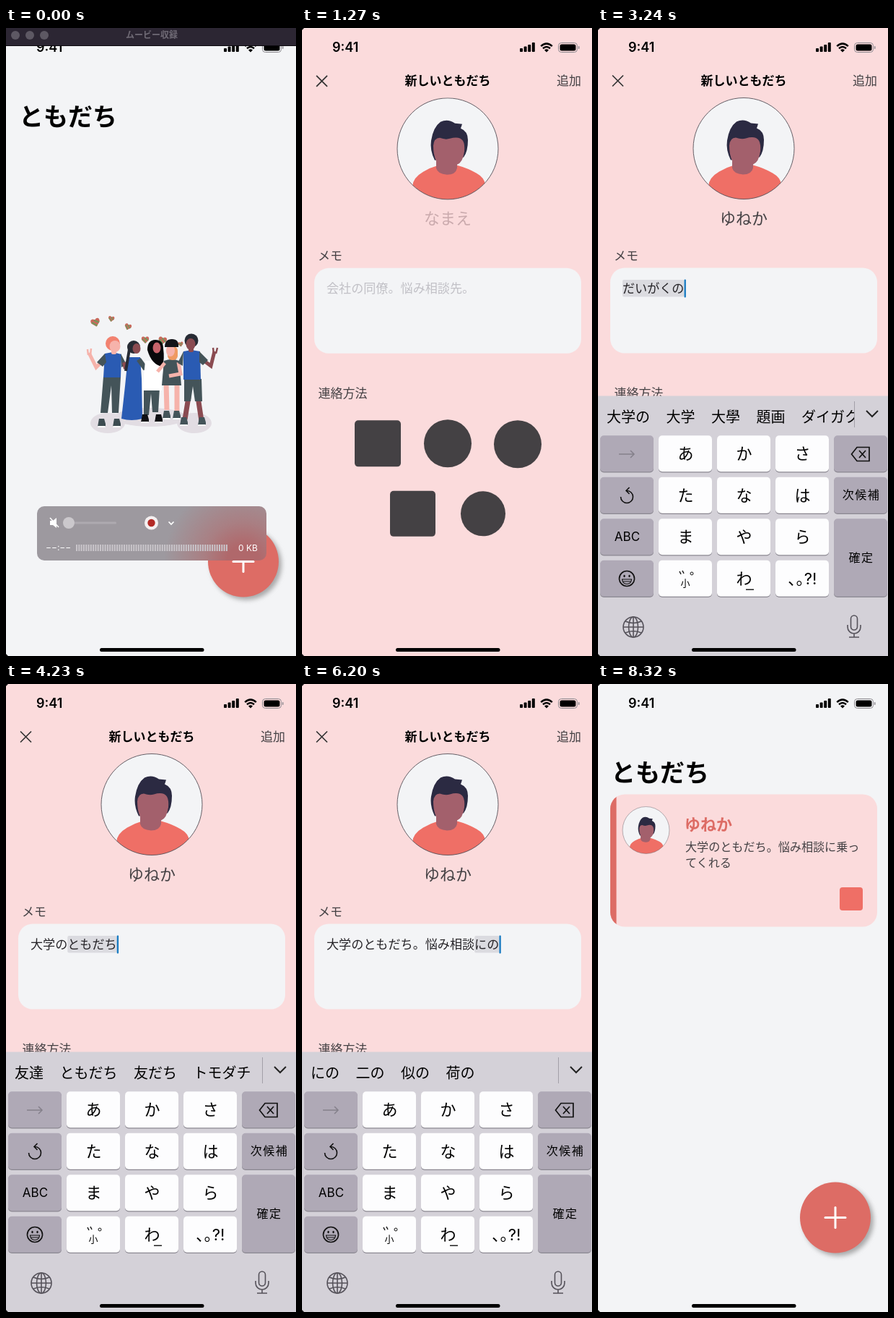
An HTML page for the animation above (8460 ms loop, 402x868 px).

```html
<!DOCTYPE html>
<html lang="ja">
<head>
<meta charset="utf-8">
<style>
html, body { margin: 0; width: 100%; height: 100%; overflow: hidden; background: #f3f4f6; }
svg { display: block; width: 402px; height: 868px; font-family: Inter, "Noto Sans CJK JP", "Noto Sans CJK", sans-serif; fill: #444144; }
.mid { text-anchor: middle; }
.stroke { fill: none; stroke: #3b383c; stroke-width: 1.6; }
.black { fill: #000; }
</style>
</head>
<body>
<svg id="stage" viewBox="0 0 402 868"></svg>
<script>
const LOOP = 8460, FRAME = 141;
const CORAL = '#dd6c65', PINK = '#fbdbdc', PAPER = '#f3f4f6', SLATE = '#445459', BLUE = '#2a5bb3';
const BROWN = '#8a4b51', ROSE = '#f6b3ab', INK = '#272b34', GREY = '#444144';
const FRIEND = 'ゆねか', MEMO = ['大学のともだち。悩み相談に乗っ', 'てくれる'];

const rect = (x, y, w, h, r, fill, more = '') => `<rect x="${x}" y="${y}" width="${w}" height="${h}" rx="${r}" fill="${fill}" ${more}/>`;
const disc = (x, y, r, fill, more = '') => `<circle cx="${x}" cy="${y}" r="${r}" fill="${fill}" ${more}/>`;
const oval = (x, y, rx, ry, fill) => `<ellipse cx="${x}" cy="${y}" rx="${rx}" ry="${ry}" fill="${fill}"/>`;
const shape = (d, fill) => `<path d="${d}" fill="${fill}"/>`;
const stroke = (d, color = '#3b383c', w = 1.6) => `<path d="${d}" class="stroke" style="stroke:${color};stroke-width:${w}"/>`;
const label = (x, y, size, s, more = '') => `<text x="${x}" y="${y}" font-size="${size}" ${more}>${s}</text>`;

const avatar = `
  <clipPath id="round"><circle r="70"/></clipPath>
  <g id="avatar">
    ${disc(0, 0, 70, PAPER)}
    <g clip-path="url(#round)">
      ${shape('M-49 52Q-48 40-34 32Q-24 26-13 23H13Q28 27 40 34Q51 40 52 50V75H-49Z', '#ef6f66')}
      ${shape('M-18 16Q-25 2-23-11Q-20-30-10-37Q0-42 10-35L20-34L18-28Q28-24 28-12Q28 4 22 12Z', '#2b2a42')}
      ${shape('M-20-4Q-19-15-11-15Q-3-12 3-14Q16-18 21-11Q24-6 23 4Q21 19 13 22V27Q11 36-1 36Q-14 35-16 27V17Q-20 8-20-4Z', '#a3606c')}
    </g>
    <circle r="70" fill="none" stroke="#555158" stroke-width=".9"/>
  </g>`;

const heart = (x, y, s, turn) => `<g transform="translate(${x} ${y}) rotate(${turn}) scale(${s})">
  ${shape('M0 5L-5 0Q-6-5-2-4.500L0-3L2-4.500Q6-5 5 0Z', '#c9695c')}${stroke('M-4-1L1 4M-1-3L4 1', '#6f9a5c', 1.700)}</g>`;

const shoes = (a, b, y, color) => [a, b].map(x =>
  shape(`M${x - 4} ${y - 9}h7l2 7v4h-11Z`, color) + rect(x - 6, y + 1, 11, 2, 1, '#fff')).join('');

const people = `
  ${oval(141, 546, 24, 14, '#e2dde3')}${oval(200, 538, 50, 13, '#e2dde3')}${oval(261, 546, 24, 14, '#e2dde3')}
  ${heart(124, 407, 1.2, -15)}${heart(146, 402, .8, 10)}${heart(169, 413, .9, 20)}
  ${heart(193, 431, 1, 0)}${heart(217, 432, 1.1, 10)}${heart(242, 437, .7, -10)}
  ${stroke('M137 457L125 469L115 449', ROSE, 5)}${stroke('M114 452l-1-8M117 452l1-9', ROSE, 2.500)}
  ${shoes(133, 154, 549, '#3d4c51')}
  ${shape('M135 482h24l-3 50h-9l-1-38-5 38h-10Z', SLATE)}
  ${shape('M137 450l11-2 12 3-1 32h-24Z', BLUE)}${shape('M137 450l-11 12 8 6 5-6ZM159 450l8 15-7 4Z', SLATE)}
  ${rect(146, 442, 7, 9, 2, ROSE)}${disc(148, 436, 10, '#f28270')}${oval(151, 440, 7.500, 8, ROSE)}
  ${stroke('M164 462l2 9', BROWN, 6)}
  ${shape('M169 455h17l2 30 1 55q-15 4-29 0l5-45Z', BLUE)}${stroke('M184 458l8 11 9-3', SLATE, 7)}
  ${disc(177, 441, 9, INK)}${oval(181, 443, 5.500, 7, BROWN)}${stroke('M171 444l-5 30', INK, 4)}
  ${shape('M191 497h22l-2 34h-8l-2-26-3 30h-7Z', SLATE)}${shoes(193, 212, 543, '#101014')}
  ${shape('M193 460h22l1 41h-27Z', '#fff')}${stroke('M212 464l8 8-10 6', '#fff', 6)}
  ${shape('M196 445q0-14 11-14t11 12q2 14-1 25-15-2-21-23Z', '#08080b')}${oval(209, 442, 5.500, 7.500, '#c6636b')}
  ${stroke('M222 490l1 38M237 490v40', ROSE, 7)}${shoes(223, 237, 538, SLATE)}
  ${shape('M219 460q11-4 21 0l3 34h-27Z', SLATE)}${stroke('M220 463l-10 12', ROSE, 5)}${stroke('M239 462l3 16-16 3', ROSE, 5)}
  ${rect(224, 440, 14, 19, 6, '#ef9a62')}${oval(228, 446, 6, 8, ROSE)}${shape('M220 441q0-11 10-11t9 11Z', '#141419')}
  ${stroke('M269 456L284 467L289 447', BROWN, 5)}${stroke('M288 450l-1-8M291 450l2-8', BROWN, 2.500)}
  ${stroke('M253 510l-5 31M266 510l5 33', BROWN, 7)}${shoes(247, 272, 547, SLATE)}
  ${shape('M247 485h24l1 31h-10l-3-21-3 21h-9Z', SLATE)}
  ${shape('M246 447l11-2 12 2 1 39h-24Z', BLUE)}${shape('M246 447l-8 16 7 4ZM268 447l12 12-7 7-5-4Z', SLATE)}
  ${rect(253, 438, 7, 10, 2, BROWN)}${disc(257, 432, 9.500, INK)}${oval(256, 437, 6.500, 8, BROWN)}`;

const home = `
  ${rect(0, 0, 402, 868, 0, PAPER)}
  ${label(18, 135, 34, 'ともだち', 'font-weight="700" class="black"')}
  <g id="people">${people}</g>
  <g id="card">
    <clipPath id="cardClip">${rect(17, 152.500, 370, 183, 20, '#000')}</clipPath>
    <g clip-path="url(#cardClip)">${rect(17, 152, 370, 184, 0, PINK)}${rect(17, 152, 8.500, 184, 0, CORAL)}</g>
    <use href="#avatar" transform="translate(66.500 202) scale(.464)"/>
    ${label(120, 202, 22, FRIEND, `font-weight="700" style="fill:${CORAL}"`)}
    ${MEMO.map((s, i) => label(121, 230.500 + 22.500 * i, 16.100, s)).join('')}
    ${rect(335, 281, 32, 32, 4, '#ef6f66')}
  </g>
  ${disc(329, 737.500, 49, CORAL, 'style="filter:drop-shadow(4px 4px 3px #7779)"')}
  ${rect(313.500, 736, 31, 3, 1.500, '#fff')}${rect(327.500, 722, 3, 31, 1.500, '#fff')}`;

const form = `
  ${rect(0, 0, 402, 868, 0, PINK)}
  <clipPath id="body"><rect y="96" width="402" height="772"/></clipPath>
  <g clip-path="url(#body)"><g id="content">
    <use href="#avatar" x="202" y="166.500"/>
    <g id="name"></g>
    ${label(22, 321, 17, 'メモ')}
    ${rect(17, 331.500, 370, 118, 20, PAPER)}
    <g id="memo"></g>
    ${label(22.500, 510.500, 17, '連絡方法')}
    ${rect(73, 542, 64, 64, 5, GREY, 'id="contact"')}
    ${disc(202, 574, 33, GREY)}${disc(299, 575, 33, GREY)}
    ${rect(122, 639.500, 63, 63, 5, GREY)}${disc(251, 671, 31, GREY)}
  </g></g>
  ${stroke('M20 65.500L35 80.500M35 65.500L20 80.500', '#333', 1.700)}
  ${label(202, 79, 17, '新しいともだち', 'class="mid black" font-weight="700"')}
  ${label(353, 79, 17, '追加')}
  <g id="scrolled">${rect(0, 96, 402, 1, 0, '#cfb3b5')}${rect(398, 207, 3, 298, 1.500, '#93858a')}</g>`;

const key = (col, row, s = '', size = 22, fill = '#fdfdfe', h = 50) => {
  const x = 3 + col * 81, y = 563.300 + row * 57.500;
  return rect(x, y + 1.200, 74, h, 5, '#8b8891') + rect(x, y, 74, h, 5, fill) +
    label(x + 37.500, y + h / 2 + size * .36, size, s, 'class="mid black"');
};
const fnKey = (col, row, s, h) => key(col, row, s, 17, '#afa9b6', h);
const KANA = ['あかさ', 'たなは', 'まやら'];

const keyboard = `
  ${rect(0, 508.500, 402, 360, 0, '#d4d1d8')}
  <clipPath id="bar"><rect y="510" width="355" height="50"/></clipPath>
  <g id="words" clip-path="url(#bar)" class="black"></g>
  <g id="more">${stroke('M355.500 516V552', '#a29fa8', 1)}${stroke('M372 529L380 537L388 529', '#222', 2)}</g>
  ${KANA.map((r, j) => [...r].map((c, i) => key(i + 1, j, c)).join('')).join('')}
  ${key(1, 3)}${key(2, 3, 'わ')}${key(3, 3, '､｡?!')}
  ${rect(205, 775.500, 11, 1.400, 0, '#111')}
  ${fnKey(0, 0, '')}${fnKey(0, 1, '')}${fnKey(0, 2, 'ABC')}${fnKey(0, 3, '')}
  ${fnKey(4, 0, '')}${fnKey(4, 1, '')}${fnKey(4, 2, '', 107.500)}
  ${stroke('M29 589H50M45 584L50 589L45 594', '#85818b', 1.500)}
  <g id="undo" class="stroke"><path d="M40 639.500A8.500 8.500 0 1 1 31.500 648M43.500 635L39 639.500L43.500 644"/></g>
  ${stroke('M351.500 589L359 579.500H376V598.500H359ZM362 584L371 594M371 584L362 594', '#111', 1.700)}
  ${disc(40, 761, 10.500, 'none', 'stroke="#111" stroke-width="1.700"')}
  ${oval(36.500, 757.500, 1.200, 1.800, '#111')}${oval(43.500, 757.500, 1.200, 1.800, '#111')}
  ${stroke('M33.500 762H46.500Q46 768.500 40 768.500T33.500 762ZM35 765H45', '#111', 1.200)}
  <g id="face">${stroke('M113 759l3.500-5 3.500 5M122 759l3.500-5 3.500 5M116 767.500h10', '#111', 1.500)}</g>
  <g id="marks">${label(121, 772, 13, '小', 'class="mid black"')}
    ${stroke('M113 751l2 4M117 750l2 4', '#111', 1.400)}${disc(130, 754, 2, 'none', 'stroke="#111"')}</g>
  <g class="mid black" font-size="16" letter-spacing="1.500"><text id="space" x="365" y="651"/><text id="enter" x="365" y="738"/></g>
  <g class="stroke" style="stroke:#55525a">
    <circle cx="49" cy="828" r="14"/><ellipse cx="49" cy="828" rx="6.500" ry="14"/>
    <path d="M49 814V842M35 828H63M38 820Q49 825 60 820M38 836Q49 831 60 836"/>
    <rect x="350.500" y="812" width="9" height="20" rx="4.500"/><path d="M346 825V828A9 9 0 0 0 364 828V825M355 837V842M348 842H362"/>
  </g>`;

const statusBar = `
  ${label(42, 33, 18, '9:41', 'font-weight="600" class="black"')}
  ${[5, 7.500, 10, 13].map((h, i) => rect(302 + i * 5.600, 33 - h, 4, h, 1, '#000')).join('')}
  ${stroke('M331.200 25.200Q339 18 346.800 25.200M334 28.300Q339 23.800 344 28.300', '#000', 2.500)}${shape('M336 30.500Q339 28 342 30.500L339 33.500Z', '#000')}
  ${rect(355.500, 20.500, 26, 13, 4, 'none', 'stroke="#8d8a90"')}${rect(357.500, 22.500, 22, 9, 2.500, '#000')}${rect(383, 25, 1.500, 4, .7, '#8d8a90')}
  ${rect(130, 857, 144.500, 5, 2.500, '#000')}
  ${shape('M0 0H3L0 3ZM0 868H3L0 865Z', '#111')}`;

const recorder = `
  ${rect(0, 0, 402, 24, 0, '#2c2633')}${rect(0, 24, 402, 1, 0, '#0b080e')}
  ${[13, 33, 53].map(x => disc(x, 10, 6, '#5d5863')).join('')}
  ${label(202, 14, 12, 'ムービー収録', 'class="mid" font-weight="700" style="fill:#6f6a75"')}
  <radialGradient id="glow" gradientUnits="userSpaceOnUse" cx="329" cy="737" r="110">
    <stop offset=".2" stop-color="#b0686b"/><stop offset=".5" stop-color="#a97f83"/><stop offset="1" stop-color="#9d999f"/>
  </radialGradient>
  ${rect(43, 661, 318, 75, 10, 'url(#glow)')}
  ${shape('M61 681h4l5-4v14l-5-4h-4Z', '#fff')}${stroke('M61 677L73 690', '#fff', 1.500)}
  ${rect(80, 682.500, 73, 3, 1.500, '#aeaab0')}${disc(87, 684, 8, '#cbc8cc')}
  ${disc(201.500, 684, 9.500, '#f4f0f1')}${disc(201.500, 684, 5.200, '#b32a26')}
  ${stroke('M225.500 682.500L229 686L232.500 682.500', '#fff', 1.700)}
  ${label(55, 722, 12, '−−:−−', 'style="fill:#fff"')}${label(322, 723, 12, '0 KB', 'style="fill:#fff"')}
  <path d="M97 718.500H307" fill="none" stroke="#c9c5ca" stroke-width="9" stroke-dasharray="2 1.300"/>`;

stage.innerHTML = `<defs>${avatar}</defs>${home}<g id="form">${form}<g id="keyboard">${keyboard}</g></g>${statusBar}<g id="recorder">${recorder}</g>`;
const el = id => document.getElementById(id);

// Typing script: [step, confirmed text, text being converted, suggestions]
const NAME_STEPS = [
  [11, '', '', ''],
  [12, '', 'ゆ', '湯 夢 雪 指 ゆっくり'],
  [13, '', 'ゆね', 'ゆね ユネ 湯根 ゆ 湯'],
  [14, '', FRIEND, FRIEND + ' 湯根か ユネカ 湯'],
  [15, FRIEND, '', ''],
];
const MEMO_STEPS = [
  [17, '', '', ''],
  [19, '', 'だ', 'だ 大 誰 だけ 大丈夫'],
  [20, '', 'だい', '大 第 台 題 大丈夫'],
  [21, '', 'だいが', '大学 大河 題が 台が'],
  [22, '', 'だいがく', '大学 大學 題画 ダイガク'],
  [23, '', 'だいがくの', '大学の 大学 大學 題画 ダイガク'],
  [25, '大学の', '', '時 友達 先生 授業 人'],
  [26, '大学の', 'と', 'と 時 友達 時に 所'],
  [27, '大学の', 'とも', '友達 とも 友 共に 友人'],
  [28, '大学の', 'ともだ', '友達 ともだち 友だち'],
  [29, '大学の', 'ともだち', '友達 ともだち 友だち トモダチ'],
  [31, '大学のともだち', '', 'と が の は です'],
  [33, '大学のともだち。', '', 'また でも 今日 それ'],
  [35, '大学のともだち。', 'な', '何 な 中 名前 なんて'],
  [36, '大学のともだち。', 'なや', '悩み 納屋 悩む 悩んで'],
  [37, '大学のともだち。', 'なやみ', '悩み 悩みの 悩みが 悩みを'],
  [39, '大学のともだち。', 'なやみそ', '悩みそう 悩みその 悩みそれ 悩みそ'],
  [40, '大学のともだち。', 'なやみそう', '悩みそう 悩み相談 悩み総'],
  [41, '大学のともだち。', 'なやみそうだん', '悩み相談 悩みそうだん 悩み'],
  [43, '大学のともだち。悩み相談', '', 'に を の が して'],
  [44, '大学のともだち。悩み相談', 'にの', 'にの 二の 似の 荷の'],
  [45, '大学のともだち。悩み相談', 'にのって', 'に乗って に載って にのって'],
  [46, '大学のともだち。悩み相談', 'にのってくれ', 'に乗ってくれ に乗ってくれる'],
  [47, '大学のともだち。悩み相談', 'にのってくれる', 'に乗ってくれる にのってくれる'],
  [48, MEMO.join(''), '', 'って から なら らしい なんて'],
];

const at = (steps, n) => steps.findLast(s => s[0] <= n) || [0, '', '', ''];
const show = (id, on) => el(id).setAttribute('visibility', on ? 'visible' : 'hidden');
const moveY = (id, y) => el(id).setAttribute('transform', `translate(0 ${y})`);
// Remaining share of a critically damped move
const settle = steps => { const x = Math.max(0, steps) * 2.270; return (1 + x) * Math.exp(-x); };

function field([, done, typing], x, y, size, hint, hintColor, caret, centred) {
  const text = done + typing, width = text.length * size;
  const left = centred ? x - (text || hint).length * size / 2 : x;
  const pad = size * .72;
  const start = left + done.length * size, end = left + width;
  return (typing ? rect(start, y - 5.300 - pad, typing.length * size, pad * 2 - 1, 2, '#aaa9b455') : '') +
    label(left, y, size, text || hint, `style="fill:${!text ? hintColor : centred ? GREY : '#262428'}"`) +
    (caret ? rect(end, centred ? 248 : 347.500, 2.400, centred ? 30 : 25, 1, '#1b7cc2') : '');
}

function draw(n) {
  const leaving = n > 50;
  const y = 868 * (leaving ? 1 - settle(n - 55.610) : settle(n - 4.500));
  show('recorder', n === 0);
  show('people', !leaving);
  show('card', leaving);
  el('form').style.display = y > 860 ? 'none' : '';
  moveY('form', y);
  moveY('keyboard', 370 * settle(n - 9.600));

  const onMemo = n >= 17, name = at(NAME_STEPS, n), memo = at(MEMO_STEPS, n);
  el('name').innerHTML = field(name, 202, 271, 22, 'なまえ', '#caaaad', n > 10 && !onMemo, true);
  el('memo').innerHTML = field(memo, 34, 365.500, 17.100, '会社の同僚。悩み相談先。', '#c1c0c6', onMemo, false);

  const [, , typing, words] = onMemo ? memo : name;
  let x = 12;
  el('words').innerHTML = words && words.split(' ').map(w => {
    const s = label(x, 544.500, 20, w);
    x += w.length * 20 + 22.500;
    return s;
  }).join('');
  show('more', words);
  el('undo').style.stroke = words ? '#111' : '#85818b';
  show('face', !typing);
  show('marks', typing);
  el('space').textContent = typing ? '次候補' : '空白';
  el('enter').textContent = typing ? '確定' : '改行';

  const scrolled = n >= 49;
  moveY('content', scrolled ? -250 : 0);
  show('scrolled', scrolled);
  el('contact').setAttribute('fill', n >= 52 ? '#ef6f66' : GREY);
}

let last = -1;
function tick() {
  const n = Math.floor((performance.now() % LOOP + 5) / FRAME) % 60;
  if (n !== last) draw(last = n);
  requestAnimationFrame(tick);
}
tick();
</script>
</body>
</html>
```
